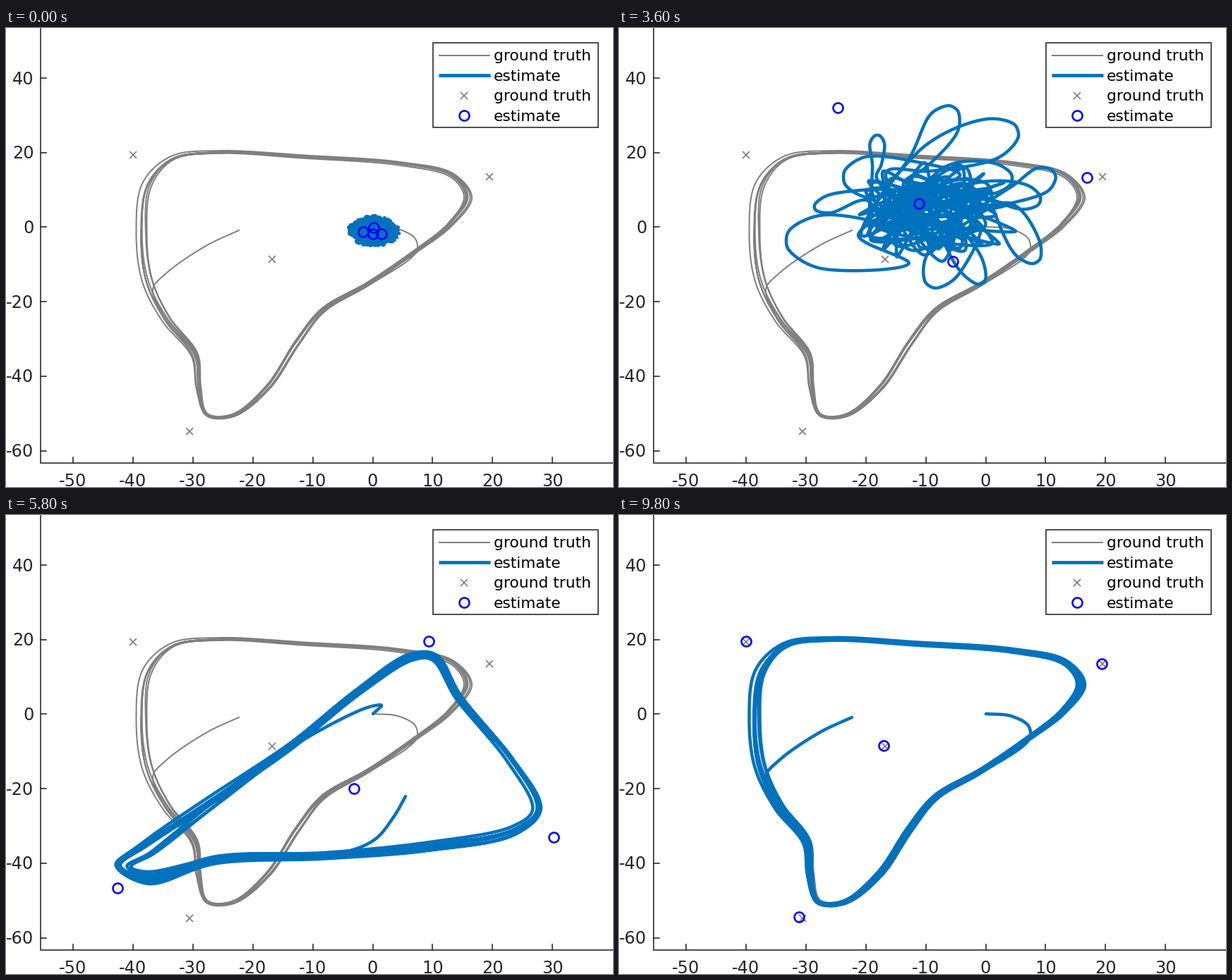
These frames come from a looping animation (860x651 px, 10000 ms). A matplotlib script:

```python
import numpy as np
import matplotlib.pyplot as plt
from matplotlib.animation import FuncAnimation
from matplotlib.patches import Rectangle

W, H, DPI = 860, 651, 64
PX = 72 / DPI                      # points per pixel
N = 6000                           # samples per trajectory
GREY, BLUE, INK = "#808080", "#0072bd", "#262626"
rng = np.random.default_rng(5)


def spline(points, n=N):
    """Centripetal Hermite curve through the points."""
    p = np.asarray(points, float)
    gaps = np.linalg.norm(np.diff(p, axis=0), axis=1) ** 0.5 + 1e-3
    t = np.r_[0, np.cumsum(gaps)]
    m = np.gradient(p, t, axis=0)
    u = np.linspace(0, t[-1], n)
    k = np.clip(np.searchsorted(t, u, side="right") - 1, 0, len(t) - 2)
    h = (t[k + 1] - t[k])[:, None]
    s = (u - t[k])[:, None] / h
    return ((1 + 2 * s) * (1 - s) ** 2 * p[k] + s * (1 - s) ** 2 * h * m[k]
            + s * s * (3 - 2 * s) * p[k + 1] + s * s * (s - 1) * h * m[k + 1])


def drive(lead, loop, tail, cut, spread, laps=6):
    """Lead-in, laps of a loop that drift sideways within its spread, tail."""
    loop = np.array(loop, float)
    tangent = np.roll(loop, -1, 0) - np.roll(loop, 1, 0)
    tangent /= np.linalg.norm(tangent, axis=1)[:, None]
    normal = np.c_[tangent[:, 1], -tangent[:, 0]]
    reach = normal * spread(loop, tangent)[:, None]

    i = np.arange(laps * len(loop) + cut)
    theta = 2 * np.pi * i / len(loop)
    drift = -0.3 + 0.45 * np.sin(0.62 * theta + 2) + 0.3 * np.sin(2.3 * theta)
    drift += 1.6 * np.exp(-((theta - 4) / 2.2) ** 4)       # one wide lap
    i %= len(loop)
    body = loop[i] + reach[i] * np.clip(drift, -1, 1)[:, None]
    return spline(np.vstack([lead, body, tail]))


def swirl(n, center, radii, power=0.45):
    angle = np.cumsum(rng.uniform(1.6, 3.4, n))
    radius = rng.random(n) ** power
    return center + np.c_[np.cos(angle), np.sin(angle)] * radius[:, None] * radii


def petal(base, tip, width):
    """Teardrop that leaves the base, rounds the tip and returns."""
    s = np.array([0.1, 0.3, 0.44, 0.5, 0.56, 0.7, 0.9])[:, None]
    axis = np.subtract(tip, base)
    side = np.array([-axis[1], axis[0]]) * width
    return base + axis * np.sin(np.pi * s) + side * np.sin(2 * np.pi * s)


def tangle(center, radii, tips, turns, width):
    parts = []
    for tip in tips:
        core = swirl(turns, center, radii)
        parts += [core, petal(core[-1], tip, width * rng.uniform(0.5, 1))]
    return spline(np.vstack(parts))


def fit_box(state, x0, y0, x1, y1):
    low, high = state.min(0), state.max(0)
    return (x0, y0) + (state - low) / (high - low) * (x1 - x0, y1 - y0)


def quadratic(p):
    x, y = ((np.asarray(p, float) - (420, 360)) / 240).T
    return np.c_[np.ones_like(x), x, y, x * x, x * y, y * y]


# Ground truth
truth = drive(
    [(520, 282), (555, 285), (580, 299)],
    [(581, 317), (515, 363), (450, 401), (414, 446), (372, 510), (322, 550),
     (284, 549), (272, 510), (267, 464), (227, 413), (200, 358), (192, 290),
     (200, 222), (235, 185), (300, 176), (420, 182), (560, 192), (633, 209),
     (655, 240), (630, 278)],
    [(208, 371), (228, 347), (285, 308), (330, 287)], 10,
    lambda xy, t: 3 + 4.5 * t[:, 1] ** 2)
landmarks = np.array([(180, 180), (685, 211), (377, 328), (260, 572)])

# Mirrored solution found halfway through
mirror = drive(
    [(520, 282), (532, 270), (512, 273), (440, 308)],
    [(400, 332), (300, 405), (205, 474), (170, 498), (200, 511), (300, 487),
     (450, 483), (600, 470), (720, 447), (752, 418), (715, 348), (640, 258),
     (606, 203), (575, 202), (500, 250)],
    [(520, 462), (550, 427), (566, 399)], 7,
    lambda xy, t: 6 + 13 * np.clip((450 - xy[:, 0]) / 280, 0, 1))

# First solution with the right orientation: a smooth warp of the truth
anchors = np.array([(520, 282), (655, 240), (300, 176), (191, 290),
                    (273, 490), (302, 554), (430, 422), (585, 312)])
shifts = [(0, 0), (-4, -3), (-15, -11), (-7, 2), (-33, -5), (-24, -16), (-22, -20), (-15, -12)]
warp = np.linalg.lstsq(quadratic(anchors), anchors + shifts, rcond=None)[0]
rough = quadratic(truth) @ warp
final = truth - np.c_[3 * np.clip((truth[:, 1] - 380) / 150, 0, 1), np.zeros(N)]

# Early tangles, each a swirling core with a few far-reaching loops
knot = spline(swirl(420, (521, 288), (37, 22), 0.9))
burst = tangle((517, 284), (50, 37),
               [(298, 205), (620, 186), (414, 248), (632, 361), (443, 315),
                (553, 229), (600, 307), (472, 340)], 24, 0.16)
cloud = tangle((448, 260), (125, 72),
               [(617, 206), (475, 113), (237, 300), (565, 145), (592, 332), (366, 152),
                (597, 245), (277, 255), (440, 366), (557, 214), (318, 212), (515, 362)],
               7, 0.22)
web = tangle((420, 225), (150, 75),
             [(430, 106), (235, 53), (579, 365), (117, 180), (560, 112), (172, 177),
              (555, 318), (378, 115), (533, 358), (192, 225), (580, 235), (290, 265),
              (527, 145)], 3, 0.16)


def state(path, *circles):
    """Trajectory samples followed by the four landmark estimates."""
    return np.vstack([path, circles])


S_KNOT = state(knot, (521, 283), (532, 292), (520, 292), (506, 289))
S_BURST = state(burst, (512, 296), (554, 279), (510, 272), (492, 278))
S_CLOUD = state(cloud, (473, 331), (663, 212), (425, 249), (310, 113))
S_WEB = state(web, (634, 340), (651, 161), (364, 229), (95, 97))
S_MIRROR = state(mirror, (776, 457), (599, 179), (493, 388), (158, 529))
S_ROUGH = state(rough, (182, 164), (678, 213), (364, 319), (227, 555))
S_FINAL = state(final, (180, 179), (684, 211), (375, 327), (255, 570))

# The picture changes only on these ticks of 200 ms
CHANGES = [*range(3, 8), *range(9, 14), *range(16, 23), *range(24, 28),
           *range(29, 32), *range(33, 42), 45, 46, 48, 49]
SETTLE = 25


def converge(step):
    return S_FINAL + (S_ROUGH - S_FINAL) * 0.57 ** (step - SETTLE)


KEYS = {0: S_KNOT, 6: S_BURST, 8: fit_box(S_CLOUD, 194, 116, 663, 471), 13: S_CLOUD,
        16: fit_box(S_WEB, 216, 73, 672, 368), 17: S_WEB,
        21: fit_box(S_MIRROR, 124, 115, 791, 566), 22: S_MIRROR,
        24: converge(24)}


def estimate(frame):
    step = sum(c <= frame for c in CHANGES)
    if step >= 24:
        return converge(step)
    a = max(k for k in KEYS if k <= step)
    b = min(k for k in KEYS if k > step)
    return KEYS[a] + (KEYS[b] - KEYS[a]) * (step - a) / (b - a)


fig = plt.figure(figsize=(W / DPI, H / DPI), dpi=DPI, facecolor="white")
ax = fig.add_axes([0, 0, 1, 1])
ax.set(xlim=(0, W), ylim=(H, 0))
ax.axis("off")


def line(x, y, color, width, z=1, **kw):
    return ax.plot(x, y, color=color, lw=width * PX, zorder=z, **kw)[0]


def label(x, y, text, size, ha, color=INK, z=1):
    ax.text(x, y, text, fontsize=size * PX, family="DejaVu Sans", ha=ha,
            va="baseline", color=color, zorder=z)


def marks(x, y, kind, z):
    size, color, width = (10, GREY, 1.7) if kind == "x" else (14, "#0000ff", 2.6)
    return ax.plot(x, y, kind, ms=size * PX, mew=width * PX, mec=color,
                   mfc="none", zorder=z)[0]


# Axes
line([49, 49, W], [0, 617, 617], INK, 1.6, solid_joinstyle="miter")
for v in range(-50, 31, 10):
    x = 519.5 + 8.495 * v
    line([x, x], [617, 609], INK, 1.6)
    label(x, 650, str(v), 24, "center")
for v in range(-60, 41, 20):
    y = 282.4 - 5.285 * v
    line([49, 57], [y, y], INK, 1.6)
    label(39.5, y + 8.7, str(v), 24, "right")

line(*truth.T, GREY, 2, 2)
path = line([], [], BLUE, 4.5, 3, solid_joinstyle="round", solid_capstyle="round")
marks(*landmarks.T, "x", 4)
circles = marks([], [], "o", 5)

# Legend
ax.add_patch(Rectangle((605, 21), 234, 119.5, fc="white", ec=INK, lw=1.6 * PX, zorder=6))
line([613, 686], [38.5, 38.5], GREY, 2, 7, solid_capstyle="butt")
line([613, 686], [66.8, 66.8], BLUE, 4.8, 7, solid_capstyle="butt")
marks([649], [95.5], "x", 7)
marks([649], [124], "o", 7)
for i, text in enumerate(["ground truth", "estimate"] * 2):
    label(691, 46.3 + 28.4 * i, text, 21.8, "left", "black", 7)


def update(frame):
    s = estimate(frame)
    path.set_data(*s[:N].T)
    circles.set_data(*s[N:].T)
    return path, circles


anim = FuncAnimation(fig, update, frames=50, interval=200, repeat=True, repeat_delay=0)
plt.show()
```
